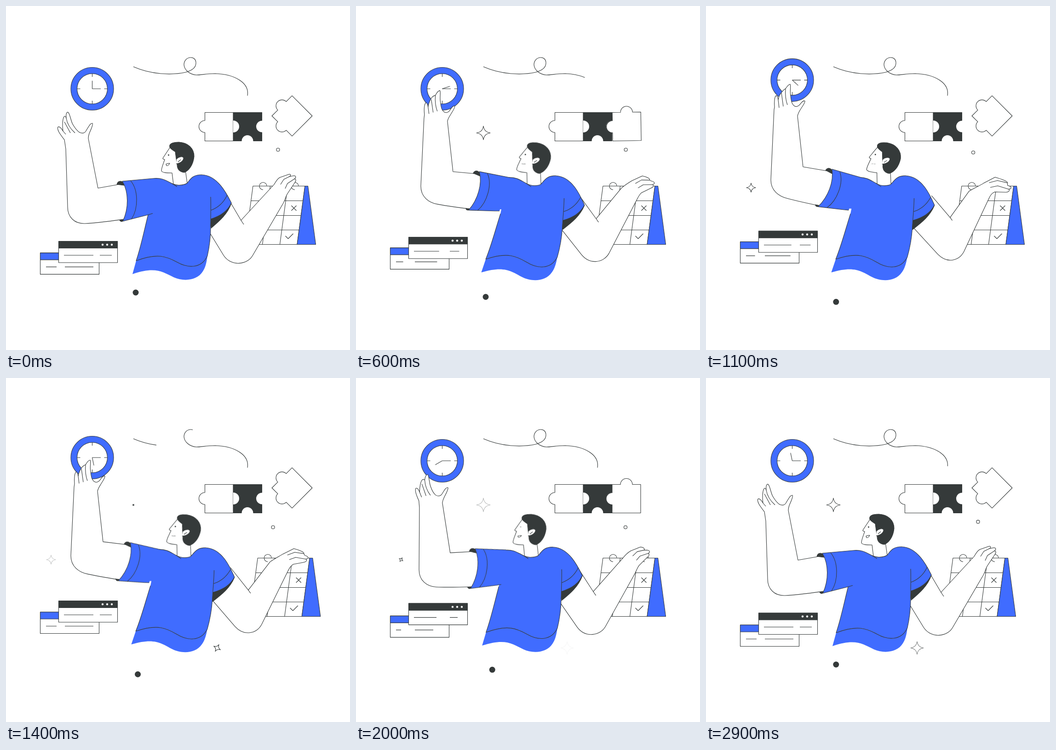
Animation, 748 px wide and 748 px high, one loop 3000 ms. Source, as an HTML page:

```html
<!DOCTYPE html>
<html lang="en">
<head>
<meta charset="utf-8">
<title>Planning</title>
<style>
  html, body { margin: 0; width: 100%; height: 100%; overflow: hidden; background: #fff; }
  svg { display: block; width: 100vw; height: 100vh; }
  .art { fill: none; stroke: #353a3a; stroke-width: 1.1; stroke-linejoin: round; }
  .white { fill: #fff; }
  .blue { fill: #406cff; }
  .dark { fill: #353a3a; }
  .flat { stroke: none; }
  #minute { transform-origin: 187.5px 180px; animation: turn 3s linear infinite; }
  @keyframes turn { to { transform: rotate(360deg); } }
</style>
</head>
<body>
<svg viewBox="0 0 748 748">
  <g class="art">
    <path id="swirl" pathLength="367" d="M277 132C315 149 360 151 391 144C405 140 413 133 413 124C413 116 408 112 402 112C393 112 387 119 387 128C388 139 399 149 414 150C425 150 435 147 455 147C495 148 530 166 525 195"/>

    <g id="clock">
      <circle class="blue" cx="187.5" cy="180" r="46.5"/>
      <circle class="white" cx="187.5" cy="180" r="33"/>
      <path d="M187.5 147v7M187.5 213v-7M154.5 180h7M220.5 180h-7M187.5 180h18.5"/>
      <path id="minute" d="M187.5 180v-17.5"/>
    </g>

    <path class="white" d="M494 231.5H432.5V249A13 13 0 0 0 432.5 275V293.5H494"/>
    <path class="dark" d="M494 231.5H556.5V249A13 13 0 0 0 556.5 275V293.5H538A13 13 0 0 0 512 293.5H494Z"/>
    <path class="white flat" d="M494 249A13 13 0 0 1 494 275Z"/>
    <path id="piece" class="white" d="M-31 -31H-13A13 13 0 0 1 13 -31H31V31H-31V13A13 13 0 0 1 -31 -13Z"/>

    <circle id="ring" class="white" r="3.5"/>
    <circle id="dot" class="dark flat" r="6.5"/>

    <g id="back">
      <path class="white" d="M74.5 537h128v46.5h-128Z"/>
      <path class="blue" d="M74.5 537h128v15h-128Z"/>
      <path id="backLines"/>
    </g>
    <g id="front">
      <path class="white" d="M114.5 511.5h128v46.5h-128Z"/>
      <path class="dark" d="M114.5 511.5h128v15h-128Z"/>
      <g class="white flat"><circle cx="210" cy="519" r="2.2"/><circle cx="220" cy="519" r="2.2"/><circle cx="230" cy="519" r="2.2"/></g>
      <path id="frontLines"/>
    </g>

    <g id="calendar">
      <path class="white" d="M537 391.5H650L633 518.5H520Z"/>
      <path class="blue" d="M650 391.5H656.5L673.5 518.5H633Z"/>
      <path d="M532.7 423.5h113M528.4 455.5h113M524.2 487h113M574.5 391.5l-17 127M612.5 391.5l-17 127"/>
      <path d="M620.5 434l11 11m0 -11l-11 11M607.5 500l6 6l11 -11"/>
      <path d="M559 399.5a8 8 0 1 1 8 -8M628 399.5a8 8 0 1 1 8 -8"/>
    </g>

    <g id="stars"></g>

    <!-- right arm -->
    <path class="white" data-k="r r" d="M478 410L511 466L583 388C587 381 590 376 595 373L615 366C620 365 620 369 616 371L626 369C631 369 631 374 627 376C631 376 631 381 628 384L612 408C608 414 606 425 601 432L536 543C525 562 490 568 473 542L440 488"
      data-to="M488 412L527 461L574 400C582 394 592 389 602 383L626 371C638 374 650 379 648 382L650 386C658 388 660 393 652 394C656 396 653 400 648 401L625 405C619 408 616 414 612 422L556 536C545 556 518 562 498 540L447 481"/>
    <path data-k="r r" d="M511 466L517 475M616 371L604 377L597 388M627 376L612 386L607 397"
      data-to="M527 461L532 468M648 382L628 379L612 385M652 394L630 390L616 395"/>

    <g id="torso">
      <path class="dark" d="M490 429C478 449 462 458 446 463V483C465 467 482 452 490 429Z"/>
      <path class="blue flat" d="M283 554C330 536 350 545 372 557C395 570 425 572 438 543C436 558 434 568 428 577C415 598 385 599 365 590C340 578 325 566 275 583Z"/>
      <path class="blue" d="M309 454C300 490 293 525 283 554C330 536 350 545 372 557C395 570 425 572 438 543C443 520 445 500 445 480L446 463C465 457 482 447 490 428C480 408 460 368 425 367C408 367 402 374 395 384C388 391 370 390 361 386C348 380 340 373 320 375"/>
      <path d="M445 415C446 432 445 450 445 480M446 444C462 438 474 426 481 411M361 386L372 393"/>
    </g>

    <!-- left arm -->
    <path class="white" data-k="h q" d="M268 462C225 468 200 472 172 473C150 474 134 460 134 437L130 311L127 291C118 279 110 269 113 263C117 261 121 267 124 272C122 260 123 243 127 240C129 239 130 241 131 244C130 234 132 230 135 231C139 234 141 250 145 257C149 264 154 271 160 275C165 277 170 277 173 273C179 264 183 254 188 255C190 258 184 270 181 277C179 283 179 286 179 288L200 396L268 384"
      data-to="M260 440C222 434 200 430 178 425C158 421 141 408 141 385L148 235L149 228C148 217 149 206 152 203C155 202 156 206 157 212C158 203 163 195 166 192C168 189 171 188 173 187C176 182 180 177 183 177C185 182 182 192 184 202C185 211 186 219 191 223C195 227 200 225 203 222C207 217 211 210 215 212C216 216 210 223 206 230C202 236 200 240 199 245L211 355L280 364"/>
    <path data-k="h q" d="M124 272L130 279M127 252L140 276M131 244C133 256 140 267 150 276"
      data-to="M157 212L159 228M164 196L168 225M173 187C172 199 173 211 177 222"/>

    <g id="sleeve">
      <path class="dark" d="M241 388C243 378 255 379 257 390ZM247 466C250 471 255 468 258 464Z"/>
      <path class="blue flat" d="M320 376L350 395L345 440L316 448L290 420Z"/>
      <path class="blue" d="M320 375L253 381C267 405 267 440 254 468L309 454L319 451"/>
      <path d="M271 380C288 400 288 440 273 463"/>
    </g>

    <g id="head">
      <path class="white" d="M357 307C350 317 345 325 341 331C341 334 344 333 345 334C342 343 338 352 338 358C339 363 350 363 361 363L364 387C372 391 386 390 394 385L390 357L380 330"/>
      <path class="dark" d="M356 307C354 299 363 296 376 296C396 297 409 310 409 327C407 347 397 358 388 362C377 361 372 354 372 344L370 332L368 317C362 313 358 311 356 307Z"/>
      <path class="white" d="M371 333C374 328 384 326 386 330C387 336 378 343 370 343"/>
      <path d="M374 339L380 334"/>
      <path id="mouth" d="M348 344C350 342 354 342 356 342C354 346 351 348 349 347Z"/>
      <ellipse id="eye" class="dark flat" cx="353.5" cy="324" rx="1.5"/>
    </g>
  </g>
</svg>
<script>
const LOOP = 3000;
const $ = id => document.getElementById(id);
const set = (id, name, value) => $(id).setAttribute(name, value);
const move = (id, x, y, rest = '') => set(id, 'transform', `translate(${x} ${y})${rest}`);

const clamp = v => Math.min(1, Math.max(0, v));
const ramp = (t, from, to) => (1 - Math.cos(Math.PI * clamp((t - from) / (to - from)))) / 2;
const hold = (t, start, up, down, end) => ramp(t, start, up) * (1 - ramp(t, down, end));
const bump = (t, start, peak, end) => hold(t, start, peak, peak, end);
const wave = t => (1 - Math.cos(2 * Math.PI * t / LOOP)) / 2;

// Paths drawn in a low and a raised pose
const NUM = /-?\d+(?:\.\d+)?/g;
const morphs = [...document.querySelectorAll('[data-to]')].map(el => ({
  el,
  d: el.getAttribute('d'),
  to: el.dataset.to.match(NUM).map(Number),
  keys: el.dataset.k.split(' ')
}));

function morph({ el, d, to, keys }, pose) {
  let i = 0;
  el.setAttribute('d', d.replace(NUM, a => {
    const k = pose[keys[i % 2]];
    return (a * (1 - k) + to[i++] * k).toFixed(2);
  }));
}

const stars = [
  { x: 277, y: 276, r: 15, start: 350, every: 1035 },
  { x: 98, y: 395, r: 10, start: 765, every: 1165 },
  { x: 459, y: 587, r: 14, start: 1310, every: 1030 }
];
for (const s of stars) {
  s.el = document.createElementNS('http://www.w3.org/2000/svg', 'path');
  s.el.setAttribute('class', 'white');
  $('stars').append(s.el);
}

function drawStar({ el, x, y, r, start, every }, t) {
  const age = t < start ? -1 : (t - start) % every;
  const u = clamp(age / 250), R = r * (1 - (1 - u) ** 2), c = R * .12;
  el.setAttribute('opacity', age < 0 ? 0 : 1 - clamp((age - 470) / 230));
  el.setAttribute('d', `M0 ${-R}Q${c} ${-c} ${R} 0Q${c} ${c} 0 ${R}Q${-c} ${c} ${-R} 0Q${-c} ${-c} 0 ${-R}Z`);
  el.setAttribute('transform', `translate(${x} ${y}) rotate(${45 * (1 - u)})`);
}

// A gap runs along the line
function drawSwirl(t) {
  const head = t < 82 ? 0 : (t - 82) % 1120 * .82;
  const tail = Math.max(0, head - 111);
  set('swirl', 'stroke-dasharray', head ? `${tail} ${head - tail} 999 0` : 'none');
}

function drawWindows(t) {
  const s = bump(t, 330, 800, 1270) + bump(t, 1530, 2000, 2400);
  move('back', 0, -28 * wave(t + 50));
  move('front', 0, -27.5 * wave(t - 30));
  set('backLines', 'd', `M87 567.5H${110 - 12 * s}M128 567.5H${190 - 22 * s}`);
  set('frontLines', 'd', `M126 542H${190 - 15 * s}M204 542H${230 - 9 * s}`);
}

function drawPiece(t) {
  const away = 1 - hold(t, 50, 350, 560, 1000) - hold(t, 1550, 1950, 2050, 2460);
  move('piece', 588 + 34 * away, 262.5 - 23.5 * away, ` rotate(${-45 * away})`);
}

function drawPerson(t, lift, push) {
  const dip = bump(t, 2150, 2400, 2850);
  const p = hold(t, 0, 400, 1500, 2300) - .08 * dip;
  const n = p - .12 * dip;
  const h = hold(t, 0, 640, 1500, 2430);
  const q = .88 * h + .25 * lift;
  const r = .7 * h + .55 * push - .1 * dip;
  const smile = 1 - .8 * clamp(n);

  morphs.forEach(m => morph(m, { h: h - .08 * dip, q, r }));
  set('torso', 'transform', `matrix(1 ${.04 * p} ${-.06 * p} 1 ${32.4 * p} ${-14.8 * p})`);
  set('sleeve', 'transform', `rotate(${18.6 * q} 334 424)`);
  move('head', 14 * n, n, ` rotate(${6 * n} 374 330)`);
  move('mouth', 0, 345 * (1 - smile), ` scale(1 ${smile})`);
  set('eye', 'ry', 1.5 - bump(t, 1900, 2000, 2100));
}

function draw(t) {
  const lift = bump(t, 650, 1120, 1600);
  const push = bump(t, 680, 1150, 1670);
  move('clock', 0, -19 * lift);
  move('calendar', 19.5 * push, 0);
  move('dot', 282 + 16 * bump(t, 900, 2300, 3000), 623 + 21.5 * bump(t, 0, 1300, 2750));
  move('ring', 591.5 - 11 * bump(t, 0, 1300, 2700), 312.5 + 12 * hold(t, 800, 1400, 2300, 2950));
  drawPerson(t, lift, push);
  drawSwirl(t);
  drawWindows(t);
  drawPiece(t);
  stars.forEach(s => drawStar(s, t));
}

const began = performance.now();
function tick() {
  draw((performance.now() - began) % LOOP);
  requestAnimationFrame(tick);
}
tick();
</script>
</body>
</html>
```
